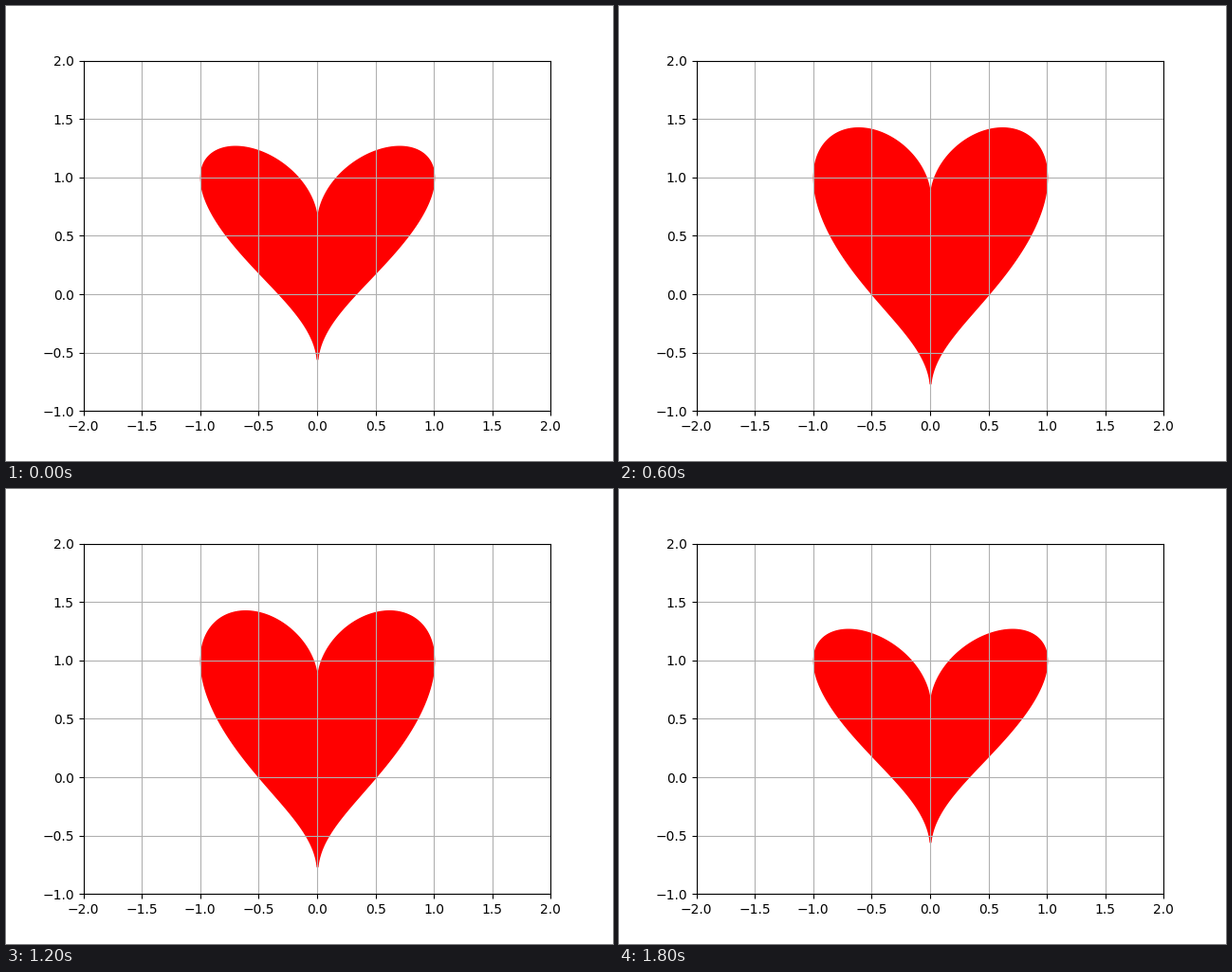
A matplotlib script for the animation above (1.9 s loop, 640 px wide and 480 px high).

```python
import numpy as np
import matplotlib.pyplot as plt
from matplotlib.animation import FuncAnimation

FRAMES = 19
INTERVAL = 100

plt.rcParams["font.family"] = "DejaVu Sans"
fig, ax = plt.subplots(figsize=(6.4, 4.8), dpi=100)
ax.set_aspect("equal")
ax.set_xlim(-2, 2)
ax.set_ylim(-1, 2)
ax.set_xticks(np.arange(-2, 2.1, 0.5))
ax.set_yticks(np.arange(-1, 2.1, 0.5))
ax.grid(True)

x = np.linspace(-1, 1, 400)
ridge = np.sqrt(np.abs(x))
arc = np.sqrt(1 - x**2)


def beat(frame):
    """Half-height of the heart, largest in the middle of the loop."""
    return 0.65 + 0.2 * np.cos(0.2 * (frame - FRAMES // 2))


def update(frame):
    """Fill an ellipse sheared along sqrt(|x|)."""
    for old in list(ax.collections):
        old.remove()
    height = beat(frame)
    heart = ax.fill_between(x, ridge - height * arc, ridge + height * arc,
                            color="red")
    return heart,


anim = FuncAnimation(fig, update, frames=FRAMES, interval=INTERVAL,
                     init_func=lambda: update(0), repeat=True, repeat_delay=0)
plt.show()
```
